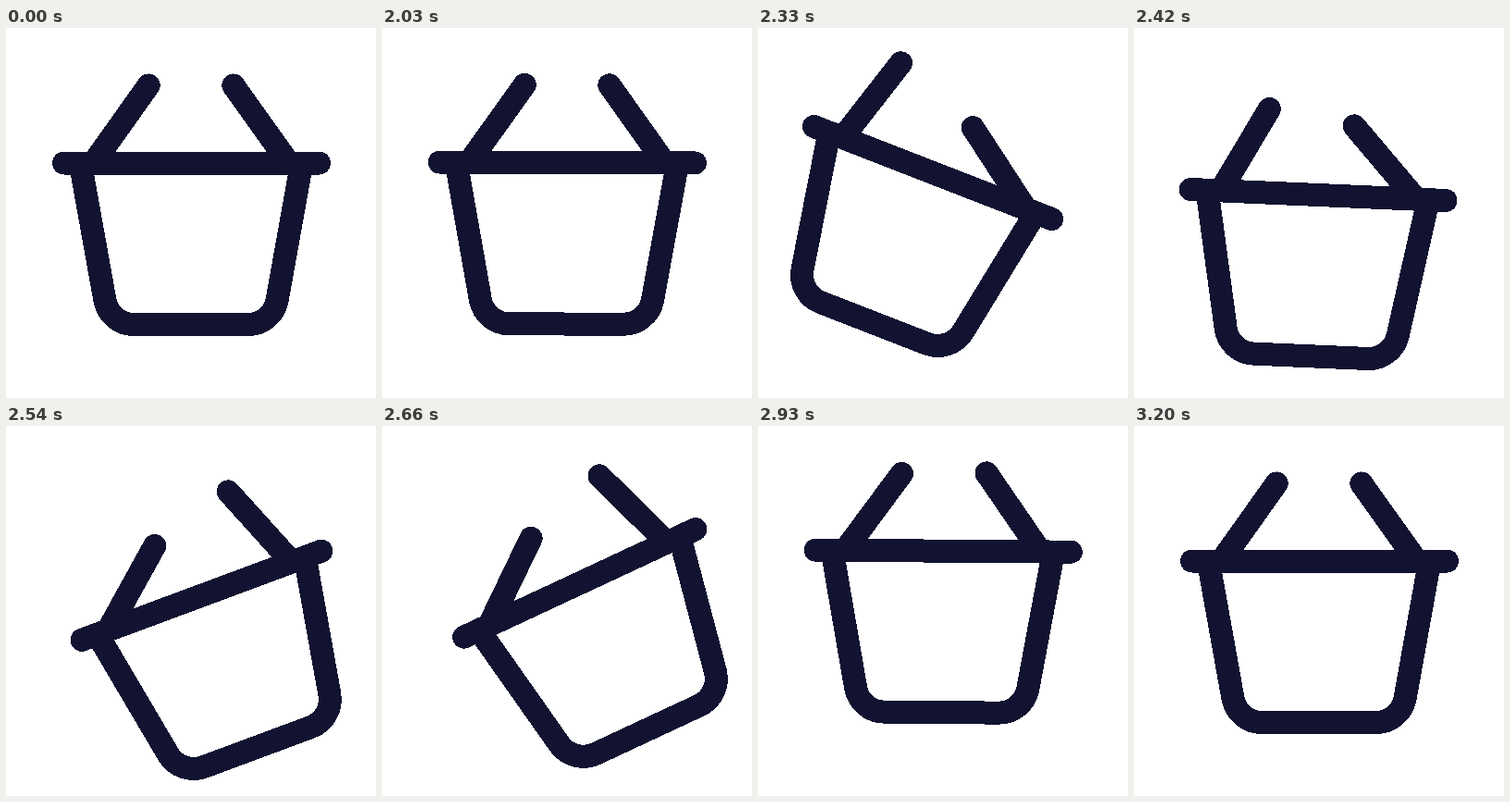
These frames come from a looping animation (400x400 px, 3.23 s). An HTML page:

```html
<!DOCTYPE html>
<html lang="en">
<head>
<meta charset="utf-8">
<title>Swinging basket</title>
<style>
  html, body { margin: 0; width: 100%; height: 100%; overflow: hidden; background: #fff; }
  svg { display: block; width: 100vw; height: 100vh; }
  path {
    fill: none; stroke: #121331; stroke-width: 25; stroke-linecap: round;
    shape-rendering: crispEdges;
  }
</style>
</head>
<body>
<svg viewBox="0 0 400 400">
  <g id="basket">
    <path d="M62.5 146H338.5"/>
    <path d="M81 150L107 294.8A32 32 0 0 0 138.5 320.5H261.5A32 32 0 0 0 293 294.8L319 150"/>
    <path id="left" d="M95 145L154.2 62"/>
    <path id="right" d="M305 145L245.8 62"/>
  </g>
</svg>
<script>
const LOOP = 3230, STEP = 30, START = 2030;

// Turning points as [time, value]; a cosine glides between neighbours.
const lift = [[2020, 0], [2135, -26], [2490, 40.7], [2995, -13], [3090, 0]];
const tilt = [[2020, 0], [2226, 30.7], [2610, -24.8], [2670, -25], [3025, 5.5], [3195, 0]];
const swing = [[2020, 0], [2240, -18], [2318, -19], [2573, 15.2], [2666, 15.2], [3040, -3], [3195, 0]];

function glide(points, t) {
  const i = points.findIndex(p => p[0] > t);
  if (i < 1) return 0;
  const [t0, v0] = points[i - 1], [t1, v1] = points[i];
  const u = (t - t0) / (t1 - t0);
  return v0 + (v1 - v0) * (1 - Math.cos(Math.PI * u)) / 2;
}

const [basket, left, right] = ['basket', 'left', 'right'].map(id => document.getElementById(id));

function draw() {
  const now = performance.now() % LOOP;
  const t = START + Math.floor((now - START) / STEP) * STEP;
  const angle = glide(swing, t);
  basket.setAttribute('transform', `translate(0 ${glide(lift, t)}) rotate(${glide(tilt, t)} 200 114.5)`);
  left.setAttribute('transform', `rotate(${angle} 97 142.2)`);
  right.setAttribute('transform', `rotate(${angle} 303 142.2)`);
  requestAnimationFrame(draw);
}
draw();
</script>
</body>
</html>
```
